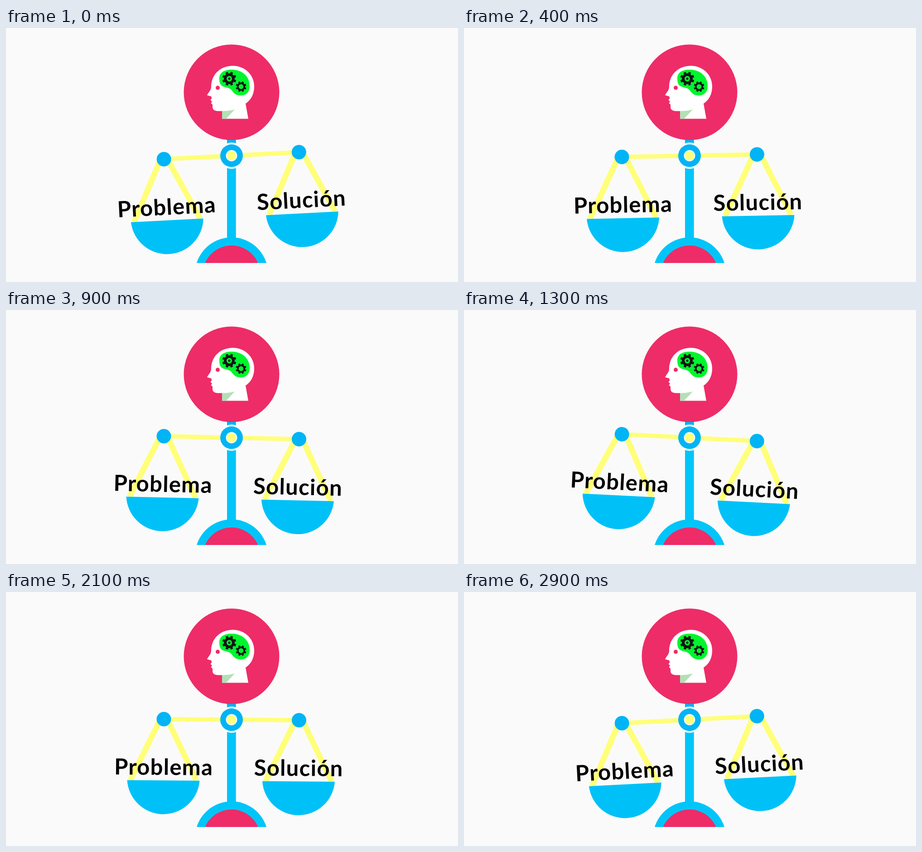
Recreate the animation shown at these times as an HTML page. Size 998x561 px, loop 3000 ms.

```html
<!DOCTYPE html>
<html lang="es">
<head>
<meta charset="utf-8">
<title>Problema y solución</title>
<style>
  html, body { margin: 0; width: 100%; height: 100%; overflow: hidden; background: #fafafa; }
  svg { display: block; width: 100%; height: 100%; }
  text { font: 700 49px Lato, sans-serif; letter-spacing: 1.3px; text-anchor: middle; }
  .sky { fill: #00c5f9; }
  .pan { fill: #00c1f7; }
  .blue { fill: #00b4f5; }
  .pink { fill: #ee2c68; }
  .yellow { fill: none; stroke: #ffff78; }
  .paper { fill: #fafafa; }
  .gear { fill: none; stroke: #141414; }
</style>
</head>
<body>
<svg viewBox="0 0 998 561">
  <defs>
    <g id="pan">
      <path class="yellow" stroke-width="12.500" d="M-8 1L-73 135M8 1L73 135"/>
      <circle class="blue" r="16"/>
      <path class="pan" d="M-80 135.3A80.2 80.2 0 0 0 80 135.3Z"/>
    </g>
  </defs>

  <path class="blue" d="M488 240h19.700v20h-19.700z"/>
  <path class="sky" d="M488 282h19.700v190h-19.700z"/>
  <path class="sky" d="M421 519A80.700 80.700 0 0 1 575 519Z"/>
  <path class="pink" d="M439.500 519A63.500 63.500 0 0 1 556.500 519Z"/>
  <circle class="pink" cx="498" cy="142" r="105.500"/>

  <path fill="#fff" d="M477 200.500V183.500H468C460 183.500 456 180 456 174V169L452.500 166 455 162.500 451.500 159
    454.500 155 453 151 444 148.500C446 143 453 138 453 130C453 103 473 83.500 501 83.500
    C528 83.500 548 104 548 129C548 146 541 159 529 167L535 200.500Z"/>
  <path fill="#b0e2b4" d="M477 183.500Q492 183.500 505 180L486 200.500H477Z"/>
  <circle class="pink" cx="467.500" cy="132" r="4.500"/>
  <path fill="#00f52d" d="M471 112C471 98 482 92 498 92C522 92 538 107 538 128C538 142 530 149 518 149
    C506 149 502 142 498 137C493 131 484 132 477 128C472 124 471 118 471 112Z"/>
  <g class="gear" transform="translate(493 112) rotate(11)">
    <circle r="9" stroke-width="6"/>
    <circle r="13.500" stroke-width="4" pathLength="16" stroke-dasharray="1"/>
    <circle r="2.500" fill="#141414" stroke="none"/>
  </g>
  <g class="gear" transform="translate(519 129.500) rotate(11)">
    <circle r="7.300" stroke-width="4"/>
    <circle r="10.300" stroke-width="3" pathLength="16" stroke-dasharray="1"/>
  </g>

  <circle class="paper" cx="498" cy="282" r="29"/>
  <g id="beam">
    <path class="yellow" stroke-width="9.500" d="M-149.500 0H149"/>
    <use href="#pan" x="-149.500"/>
    <use href="#pan" x="149"/>
    <text x="-149" y="123">Problema</text>
    <text x="149" y="123">Solución</text>
  </g>
  <g transform="translate(498 282)">
    <circle class="blue" r="25"/>
    <circle class="paper" r="12.500"/>
    <circle r="10" fill="#ffff78"/>
  </g>
</svg>
<script>
  const beam = document.getElementById('beam');

  // Near-linear swing from -3 to 3 degrees and back, rounded at the peak.
  function tilt(seconds) {
    const u = Math.min(seconds, 2.9) - 1.375;
    return 3.63 - 4.565 * Math.hypot(u, 0.131) + 0.235 * u;
  }

  function draw() {
    const step = Math.floor(performance.now() % 3000 / 100);
    beam.setAttribute('transform', `translate(498 282) rotate(${tilt(step / 10)})`);
    requestAnimationFrame(draw);
  }
  draw();
</script>
</body>
</html>
```
